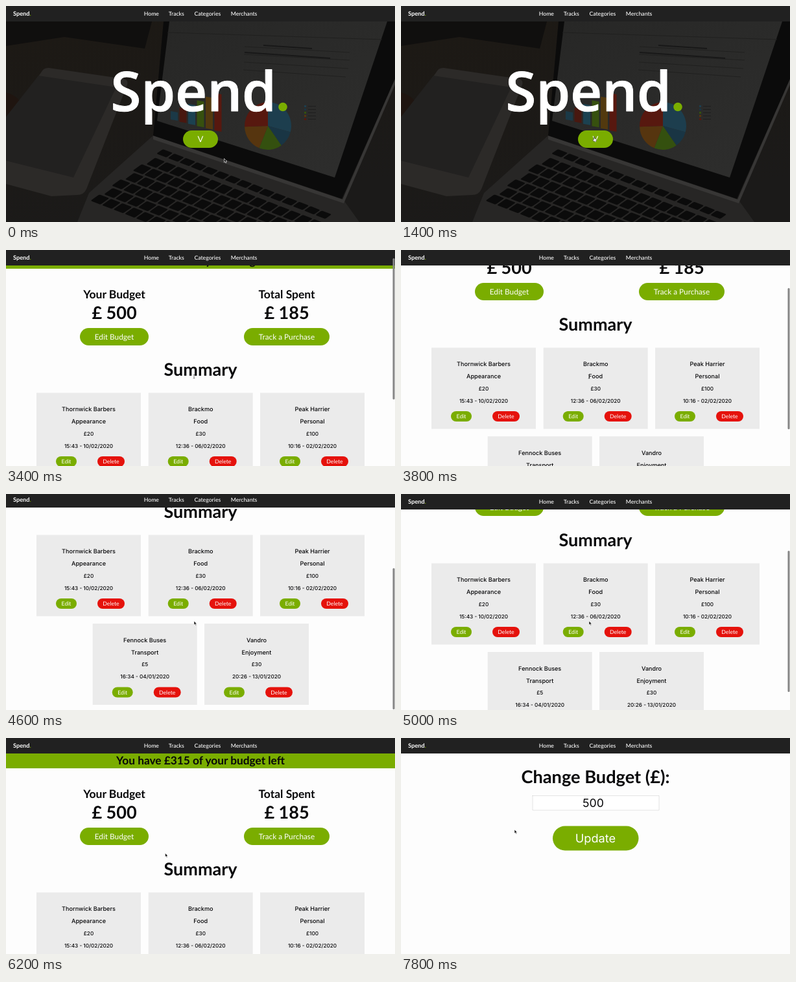
Write an HTML page that moves like this. It is 600 px wide and 335 px high and loops after 8000 ms.

```html
<!DOCTYPE html>
<html lang="en">
<head>
<meta charset="utf-8">
<title>Spend.</title>
<style>
  html, body { margin: 0; width: 100%; height: 100%; overflow: hidden; background: #fdfdfd; }
  svg { display: block; width: 100vw; height: 100vh; text-rendering: geometricPrecision; }
  text { font-family: Lato, sans-serif; fill: #070709; }
  .bold { font-weight: 700; }
  .mid { text-anchor: middle; }
  .light { fill: #fff; }
  .round { font-family: Inter, sans-serif; }
  .hero { font: 600 85px "Open Sans", sans-serif; stroke: #fff; stroke-linejoin: round; }
  .green { fill: #7aad00; }
  .red { fill: #e5120c; }
</style>
</head>
<body>
<svg viewBox="0 0 600 335">
  <defs>
    <linearGradient id="desk" x2="0.3" y2="1">
      <stop offset="0" stop-color="#1d1914"/><stop offset="1" stop-color="#1b1a19"/>
    </linearGradient>
    <linearGradient id="glass" x2="1" y2="1">
      <stop offset="0" stop-color="#272726"/><stop offset="1" stop-color="#2e2e2d"/>
    </linearGradient>
  </defs>

  <g id="home">
    <path fill="url(#desk)" d="M0 0H600V335H0z"/>
    <path fill="#100f0e" d="M0 24H225L214 66 90 48 0 62z"/>
    <path fill="#1f1510" d="M0 134Q22 140 25 158L8 204 0 208z"/>
    <path fill="#2c2a28" d="M57 99Q60 96 66 96L182 113Q189 115 187 122L124 284Q120 293 110 293L70 295 0 276V180z"/>
    <path fill="#222120" d="M50 108L170 126 104 266 0 240V172z"/>
    <path fill="#272625" d="M228 200L520 300 545 335H110L128 290z"/>
    <g id="keys" fill="#0b0b0b" transform="matrix(17.5 6.8 -16.3 11.7 242 222)"></g>
    <path fill="#373635" d="M227 201L519 300 600 112V122L521 306 227 207z"/>
    <path fill="#0b0b0b" d="M243 24H600V113L518 299 227 201z"/>
    <path fill="url(#glass)" d="M252 24H588L507 266 233 178z"/>
    <g stroke="#20201f" fill="none">
      <path d="M249 41L580 52M368 63L530 72M367 75L530 84M367 87L528 97M366 99L524 110"/>
      <path stroke="#181818" stroke-width="2" d="M397 61L472 66M368 72L500 81"/>
    </g>
    <g id="bars"></g>
    <g id="pie"></g>
    <text class="light hero" x="161.5" y="162.7">Spend</text>
    <circle class="green" cx="427" cy="156.5" r="6.8"/>
    <rect class="green" x="273" y="193" width="54" height="27" rx="13.5"/>
    <text class="mid light" x="300" y="210.5" font-size="13">V</text>
  </g>

  <g id="tracks">
    <path class="green" d="M0 23H600V47H0z"/>
    <text class="bold mid" x="300" y="41" font-size="17.3">You have £315 of your budget left</text>
    <text class="bold mid" x="167" y="92.5" font-size="17.5">Your Budget</text>
    <text class="bold mid" x="433" y="92.5" font-size="17.5">Total Spent</text>
    <text class="bold mid" x="167" y="125.3" font-size="27">£ 500</text>
    <text class="bold mid" x="433" y="125.3" font-size="27">£ 185</text>
    <rect class="green" x="114" y="139" width="106" height="27" rx="13.5"/>
    <text class="mid light" x="167" y="156.7" font-size="11.8">Edit Budget</text>
    <rect class="green" x="367" y="139" width="132" height="27" rx="13.5"/>
    <text class="mid light" x="433" y="156.7" font-size="11.8">Track a Purchase</text>
    <text class="bold mid" x="300" y="212.5" font-size="27">Summary</text>
    <g id="cards"></g>
  </g>

  <g id="form">
    <text class="bold mid" x="300" y="70" font-size="27.2">Change Budget (£):</text>
    <rect x="203" y="89.5" width="195" height="22.5" fill="#fff" stroke="#bbb" stroke-width=".8" stroke-dasharray="1 1"/>
    <text class="mid round" x="296.5" y="107" font-size="17.7">500</text>
    <rect class="green" x="234" y="136.5" width="132.5" height="38" rx="19"/>
    <text class="mid light round" x="300" y="161.8" font-size="18.2">Update</text>
  </g>

  <g id="nav">
    <path fill="#212121" d="M0 0H600V24H0z"/>
    <text class="bold light" x="11" y="15" font-size="9.2">Spend<tspan class="green">.</tspan></text>
    <g font-size="8.7" font-weight="500">
      <text class="light" x="212.7" y="15">Home</text>
      <text class="light" x="250.8" y="15">Tracks</text>
      <text class="light" x="290.4" y="15">Categories</text>
      <text class="light" x="346.7" y="15">Merchants</text>
    </g>
  </g>

  <g id="status">
    <path fill="#141518" d="M0 327.5H198Q200 327.5 200 329.5V335H0z"/>
    <text x="2" y="333.2" font-size="4.6" style="fill:#8b8b8b">Waiting for localhost...</text>
  </g>
  <rect id="thumb" x="596.5" width="3" height="219" rx="1.5" fill="#858585"/>

  <g id="cursor">
    <path id="arrow" d="M0 0V6L1.4 4.8 2.4 7 3.4 6.5 2.5 4.4H4.3z" fill="#111" stroke="#fff" stroke-width=".6"/>
    <path id="hand" d="M-.6 0Q0-.8.6 0V2.6L3 3.2Q3.6 3.6 3.2 6L2.6 7H-.8L-2.4 4.4-1.8 3.8-.6 4.6z" fill="#fff" stroke="#222" stroke-width=".6"/>
    <path id="beam" d="M-1.3-3Q0-3 0-2.2Q0-3 1.3-3M0-2.2V2.4M-1.3 3Q0 3 0 2.4Q0 3 1.3 3" fill="none" stroke="#444" stroke-width=".7"/>
  </g>
</svg>

<script>
const LOOP = 8000, STEP = 200, MAX_SCROLL = 173;
const $ = id => document.getElementById(id);

// Home picture details
for (let row = 0; row < 7; row++)
  for (let col = 0; col < 15; col++)
    $('keys').innerHTML += `<rect x="${col + row % 2 * 0.25}" y="${row}" width=".87" height="${row ? 0.84 : 0.6}" rx=".1"/>`;

['#1b3947', '#481810', '#1c4150', '#37500f', '#52390f', '#57180f'].forEach((color, i) => {
  const x = 254 + i * 13.5, bottom = 176 + i * 3.4, height = 13 + i * 9;
  $('bars').innerHTML += `<path fill="${color}" d="M${x} ${bottom}v${-height}l11 2v${height}z"/>`;
});

const pieSlices = [[-90, 15, '#1d3e4e'], [15, 55, '#193544'], [55, 112, '#34500f'], [112, 178, '#56350f'], [178, 270, '#57180f']];
pieSlices.forEach(([from, to, color], i) => {
  const rim = deg => `${404 + 36 * Math.cos(deg * Math.PI / 180)} ${186 + 37 * Math.sin(deg * Math.PI / 180)}`;
  $('pie').innerHTML += `<path fill="${color}" d="M404 186L${rim(from)}A36 37 0 0 1 ${rim(to)}z"/>
    <path fill="${color}" d="M460 ${154 + i * 5}h3v3h-3z"/><path fill="#1e1e1e" d="M466 ${155 + i * 5}h12v1h-12z"/>`;
});

// Purchase cards
const purchases = [
  [47, 239.5, 'Thornwick Barbers', 'Appearance', '£20', '15:43 - 10/02/2020'],
  [219.7, 239.5, 'Brackmo', 'Food', '£30', '12:36 - 06/02/2020'],
  [392, 239.5, 'Peak Harrier', 'Personal', '£100', '10:16 - 02/02/2020'],
  [133.7, 377, 'Fennock Buses', 'Transport', '£5', '16:34 - 04/01/2020'],
  [306, 377, 'Vandro', 'Enjoyment', '£30', '20:26 - 13/01/2020'],
];
const pill = (x, width, color, label) =>
  `<rect class="${color}" x="${x}" y="98.5" width="${width}" height="16" rx="8"/>
   <text class="mid light" x="${x + width / 2}" y="109.5" font-size="8.7">${label}</text>`;
$('cards').innerHTML = purchases.map(([x, y, ...lines]) =>
  `<g transform="translate(${x} ${y})"><rect width="161" height="126" fill="#ebebeb"/>` +
  lines.map((line, i) => `<text class="mid round" x="80.5" y="${28.6 + i * 18.9}" font-size="${i < 2 ? 9.1 : 8.2}" font-weight="500">${line}</text>`).join('') +
  pill(30, 32, 'green', 'Edit') + pill(94, 42, 'red', 'Delete') + '</g>').join('');

// Keys are [time, ...values]
const scrollKeys = [[3200, 0], [3400, 18], [3800, 88], [4200, 152], [4600, 176], [4800, 173], [5000, 132], [5200, 40], [5400, -3], [5600, 0]];
const cursorKeys = [[200, 336.5, 236.5], [1200, 298, 203], [2400, 298, 203], [3200, 290, 196], [4600, 290, 197], [5600, 290, 197], [6200, 245.5, 178.5], [7000, 175, 142]];
const cursorKinds = [[0, 'arrow'], [1000, 'hand'], [2400, 'beam'], [4000, 'arrow'], [5200, 'beam'], [5800, 'arrow'], [6800, 'hand'], [7600, 'arrow']];

function valuesAt(keys, time) {
  const next = keys.findIndex(key => key[0] > time);
  if (next === 0) return keys[0].slice(1);
  if (next < 0) return keys.at(-1).slice(1);
  const a = keys[next - 1], b = keys[next], p = (time - a[0]) / (b[0] - a[0]);
  return a.slice(1).map((v, i) => v + (b[i + 1] - v) * p);
}
const show = (id, on) => $(id).style.display = on ? '' : 'none';
const move = (id, x, y) => $(id).setAttribute('transform', `translate(${x} ${y})`);

function draw(now) {
  const time = Math.floor(now % LOOP / STEP) * STEP;
  const [scroll] = valuesAt(scrollKeys, time);
  const inside = Math.max(0, Math.min(MAX_SCROLL, scroll));

  show('home', time < 2000);
  show('tracks', time >= 2000 && time < 7600);
  show('form', time >= 7600);
  show('status', time >= 1600 && time < 2600);
  show('thumb', time >= 3400 && time < 6000);

  move('tracks', 0, -scroll);
  move('nav', 0, inside - scroll);
  $('thumb').setAttribute('y', 1 + inside * 114 / MAX_SCROLL);

  move('cursor', ...valuesAt(cursorKeys, time));
  const kind = cursorKinds.findLast(key => key[0] <= time)[1];
  for (const id of ['arrow', 'hand', 'beam']) show(id, id === kind);
  requestAnimationFrame(() => draw(performance.now()));
}
draw(performance.now());
</script>
</body>
</html>
```
